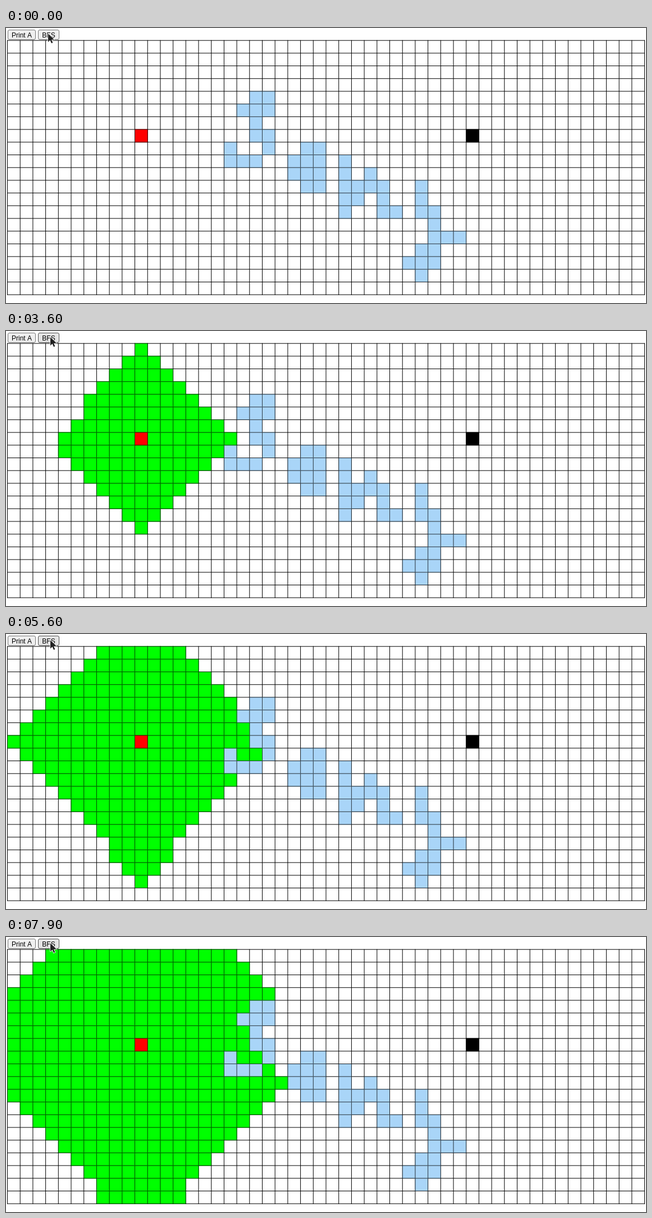
An HTML page with a canvas for the animation above (8 s loop, 1140 by 491 pixels).

```html
<!DOCTYPE html>
<html lang="en">
<head>
<meta charset="utf-8">
<title>Breadth-first search</title>
<style>
  html, body { margin: 0; width: 100%; height: 100%; overflow: hidden; background: #fff; }
  canvas { display: block; }
</style>
</head>
<body>
<canvas id="stage" width="1140" height="491"></canvas>
<script>
const ctx = document.getElementById('stage').getContext('2d');
const LOOP = 8000, FRAME = 100;
const COLS = 50, ROWS = 20, CELL = 22.7, LEFT = 2, TOP = 21.7;
const START = [10, 7], GOAL = [36, 7];
const SEARCH_START = 1420, VISIT_TIME = 20;
const STEP = { D: [0, 1], R: [1, 0], U: [0, -1], L: [-1, 0] };

const move = ([col, row], dir) => [col + STEP[dir][0], row + STEP[dir][1]];
const key = ([col, row]) => row * COLS + col;
const inside = ([col, row]) => col >= 0 && col < COLS && row >= 0 && row < ROWS;

// Walls are brush strokes: a first cell and the steps of the brush
function stroke(col, row, steps) {
  const cells = [[col, row]];
  for (const dir of steps) cells.push(move(cells[cells.length - 1], dir));
  return cells;
}
const strokes = [
  stroke(20, 4, 'LDLRRLDDRD'),
  stroke(17, 8, 'DRR'),
  stroke(22, 9, 'DRRDLUUURD'),
  stroke(26, 9, 'DDDDURURUDRDDR'),
  stroke(32, 11, 'DDRDDRRLLDDLLRUDD')
];
const walls = [...new Map(strokes.flat().map(cell => [key(cell), cell])).values()];

function searchOrder() {
  const seen = new Set([...walls, START].map(key));
  const queue = [START];
  for (const cell of queue) {
    for (const dir of 'DRUL') {
      const next = move(cell, dir);
      if (!inside(next) || seen.has(key(next))) continue;
      seen.add(key(next));
      queue.push(next);
    }
  }
  return queue.slice(1);
}
const order = searchOrder();

function fillCells(cells, color, alpha) {
  ctx.globalAlpha = alpha;
  ctx.fillStyle = color;
  for (const [col, row] of cells) {
    ctx.fillRect(LEFT + CELL * col, TOP + CELL * row, CELL + 1, CELL + 1);
  }
  ctx.globalAlpha = 1;
}

function drawGrid() {
  ctx.fillStyle = '#000';
  const width = COLS * CELL + 1, height = ROWS * CELL + 1;
  for (let c = 0; c <= COLS; c++) ctx.fillRect(LEFT + CELL * c, TOP, 1, height);
  for (let r = 0; r <= ROWS; r++) ctx.fillRect(LEFT, TOP + CELL * r, width, 1);
}

function drawButton(x, width, label, fill, border) {
  ctx.beginPath();
  ctx.roundRect(x + 0.5, 3.5, width - 1, 17, 2.5);
  ctx.fillStyle = fill;
  ctx.fill();
  ctx.strokeStyle = border;
  ctx.lineWidth = 1;
  ctx.stroke();
  ctx.fillStyle = '#000';
  ctx.font = '12px "Liberation Sans", Arial, sans-serif';
  ctx.textAlign = 'center';
  ctx.fillText(label, x + width / 2, 16.5);
}

function drawPointer(x, y) {
  ctx.save();
  ctx.translate(x, y);
  const arrow = new Path2D('M0 0V15L3.5 11.8L6 17.3L8.4 16.2L6 10.9L10.8 10.6Z');
  ctx.lineJoin = 'round';
  ctx.lineWidth = 1.6;
  ctx.strokeStyle = '#fff';
  ctx.stroke(arrow);
  ctx.fillStyle = '#222';
  ctx.fill(arrow);
  ctx.restore();
}

function pointerAt(t) {
  if (t < 400) return [75, 10];
  if (t < 800) return [74, 12];
  return t < 1000 ? [75, 14] : [79, 11];
}

function draw(t) {
  ctx.fillStyle = '#fff';
  ctx.fillRect(0, 0, 1140, 491);
  const visited = order.slice(0, Math.max(0, Math.floor((t - SEARCH_START) / VISIT_TIME)));
  const layers = [[walls, '#a9d5f8'], [visited, '#0f0'], [[START], '#f00'], [[GOAL], '#000']];
  for (const [cells, color] of layers) fillCells(cells, color, 1);
  drawGrid();
  // Coloured cells tint the lines around them
  for (const [cells, color] of layers) fillCells(cells, color, 0.15);

  const hovered = t >= 200;
  drawButton(3, 50, 'Print A', '#efefef', '#767676');
  drawButton(57, 38, 'BFS', hovered ? '#e5e5e5' : '#efefef', hovered ? '#4f4f4f' : '#767676');
  drawPointer(...pointerAt(t));
}

const begin = performance.now();
function tick() {
  const t = (performance.now() - begin) % LOOP;
  draw(Math.floor(t / FRAME) * FRAME);
  requestAnimationFrame(tick);
}
tick();
</script>
</body>
</html>
```
